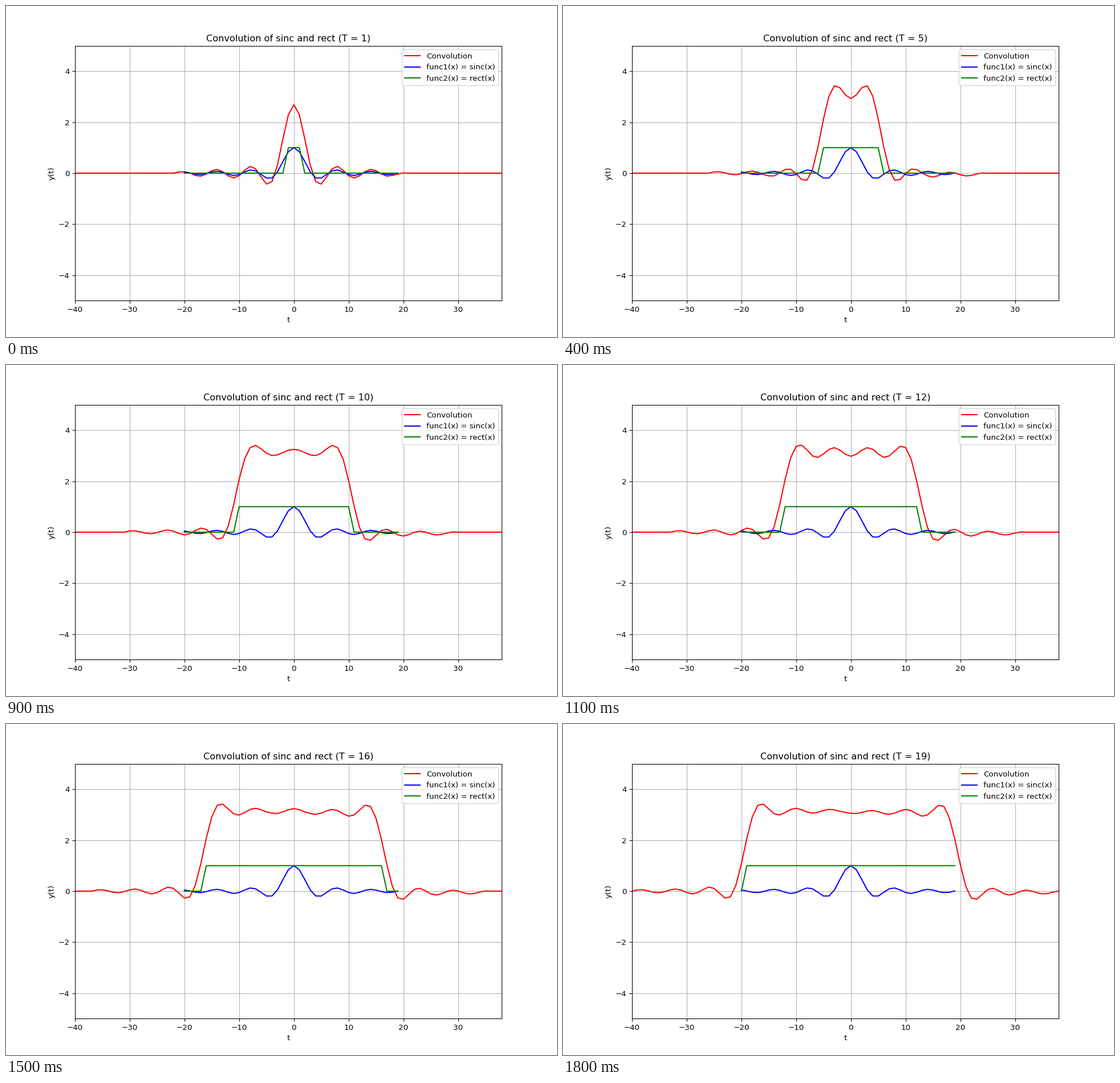
A matplotlib script for the animation above (1.9 s loop, 966 px wide and 580 px high).

```python
import numpy as np
import matplotlib.pyplot as plt
from matplotlib.animation import FuncAnimation

DPI = 96.6
SIZE = (10, 6.00415)  # inches: 966 x 580 pixels
FRAMES = 19
INTERVAL = 100  # ms

plt.rcParams["font.family"] = "DejaVu Sans"

t = np.arange(-20, 20)
t_full = np.arange(-40, 39)
sinc = np.sinc(t / np.pi)  # sin(t) / t


def rect(half_width):
    return (np.abs(t) <= half_width).astype(float)


fig, ax = plt.subplots(figsize=SIZE, dpi=DPI)
conv_line, = ax.plot(t_full, np.zeros(t_full.size), color="red", label="Convolution")
ax.plot(t, sinc, color="blue", label="func1(x) = sinc(x)")
rect_line, = ax.plot(t, np.zeros(t.size), color="green", label="func2(x) = rect(x)")

ax.set_xlim(-40, 38)
ax.set_ylim(-5, 5)
ax.set_xlabel("t")
ax.set_ylabel("y(t)")
ax.grid(True)
ax.legend(loc="upper right")
title = ax.set_title("")


def update(frame):
    width = frame + 1
    pulse = rect(width)
    conv_line.set_ydata(np.convolve(sinc, pulse))
    rect_line.set_ydata(pulse)
    title.set_text(f"Convolution of sinc and rect (T = {width})")
    return conv_line, rect_line, title


anim = FuncAnimation(fig, update, frames=FRAMES, interval=INTERVAL,
                     init_func=lambda: update(0), repeat=True, repeat_delay=0)
plt.show()
```
